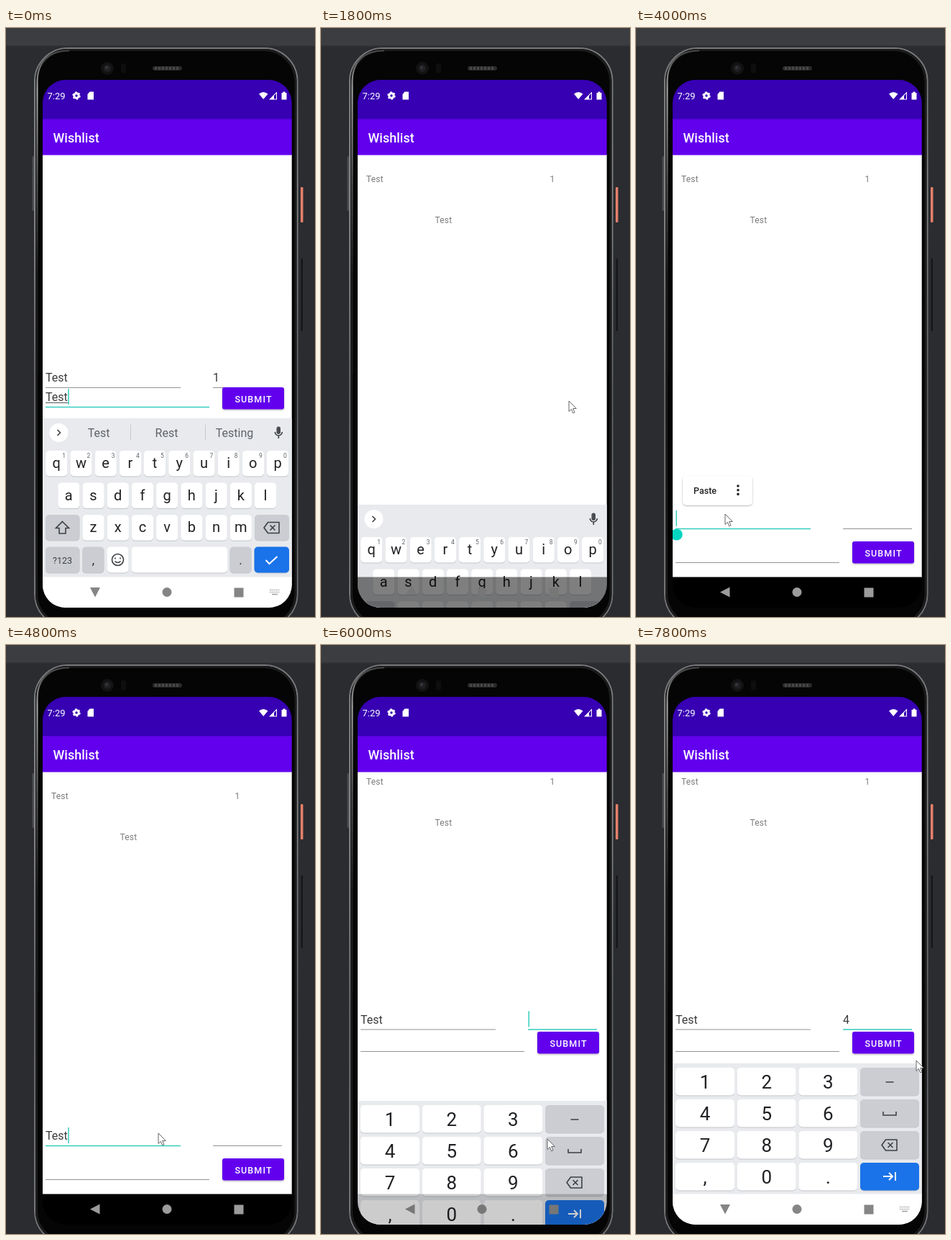
An HTML page that plays this animation: 430x818 px, repeating every 8 s.

```html
<!DOCTYPE html>
<html lang="en">
<head>
<meta charset="utf-8">
<title>Wishlist</title>
<style>
html, body { margin: 0; width: 100%; height: 100%; overflow: hidden; background: #2b2c30 }
svg { display: block; width: 430px; height: 818px; font-family: Roboto, sans-serif }
.mid { text-anchor: middle }
.line { fill: none; stroke: #3c4043; stroke-width: 1.6 }
</style>
</head>
<body>
<svg viewBox="0 0 430 818">
  <defs>
    <clipPath id="screen"><rect x="51" y="72" width="346.700" height="733" rx="32"/></clipPath>
    <linearGradient id="rim" x2="0" y2="1">
      <stop stop-color="#77797b"/><stop offset=".25" stop-color="#858687"/>
      <stop offset=".6" stop-color="#626365"/><stop offset="1" stop-color="#77787a"/>
    </linearGradient>
    <linearGradient id="gleam" x2="0" y2="1">
      <stop stop-color="#444"/><stop offset=".12" stop-color="#aaa"/>
      <stop offset=".4" stop-color="#555"/><stop offset=".7" stop-color="#1a1a1a"/>
    </linearGradient>
    <filter id="soft" x="-20%" y="-30%" width="140%" height="180%">
      <feDropShadow dx="0" dy="1.2" stdDeviation="1.3" flood-opacity=".3"/>
    </filter>
    <g id="erase" class="line">
      <path d="M-11 0L-5.5-7.5H10V7.5H-5.5Z" stroke-linejoin="round"/><path d="M-2.500-3.500l7 7m0-7l-7 7"/>
    </g>
  </defs>

  <rect width="430" height="818" fill="#2b2c30"/>
  <rect width="430" height="24" fill="#3c3d41"/>
  <rect y="24" width="430" height="1.500" fill="#333438"/>

  <!-- phone body -->
  <rect x="36.500" y="178" width="2.500" height="76" rx="1" fill="#4c4d51"/>
  <rect x="410" y="221" width="3.500" height="49" rx="1" fill="#e4806a"/>
  <rect x="410.500" y="320" width="2.500" height="101" rx="1" fill="#161618"/>
  <rect x="40" y="28" width="365.500" height="804" rx="46" fill="#050505" stroke="url(#rim)" stroke-width="2"/>
  <rect x="42.500" y="30.500" width="360.500" height="799" rx="44" fill="none" stroke="#1b1b1c" stroke-width="3"/>
  <path d="M43.500 480V76Q43.500 32 88 31.500" fill="none" stroke="url(#gleam)" stroke-width="2"/>
  <circle cx="141" cy="56" r="9" fill="#121212"/>
  <circle cx="141" cy="56" r="5" fill="#202022"/>
  <circle cx="140" cy="55" r="2" fill="#35373b"/>
  <rect x="160" y="49" width="7" height="14" rx="3" fill="#0e0e0e"/>
  <path d="M207 56H242" stroke="#2a2a2a" stroke-width="6" stroke-linecap="round"/>
  <path d="M207 56H242" stroke="#484848" stroke-width="4" stroke-dasharray="3 2"/>

  <g clip-path="url(#screen)">
    <rect x="51" y="176" width="347" height="587" fill="#fff"/>
    <rect x="51" y="72" width="347" height="55" fill="#3700b3"/>
    <rect x="51" y="126.500" width="347" height="50" fill="#6200ee"/>
    <g fill="#fff">
      <text x="57.500" y="99" font-size="13">7:29</text>
      <circle cx="98" cy="94" r="3.200" fill="none" stroke="#fff" stroke-width="3"/>
      <circle cx="98" cy="94" r="4.900" fill="none" stroke="#fff" stroke-width="1.600" stroke-dasharray="2.6 2.530"/>
      <path d="M113.500 92l3-3.500h5.500v11h-8.500z"/>
      <path d="M352 91.500Q358 86.500 364.500 91.500L358.200 99Z"/>
      <path d="M366 99.500L377 88.500V99.500Z"/>
      <path d="M373 98.500V94L376 91V98.500Z" fill="#3700b3"/>
      <path d="M383.500 90h2v-1.500h3v1.500h2v9.500h-7z"/>
      <text x="65.500" y="159" font-size="18" font-weight="500">Wishlist</text>
    </g>

    <g id="item" font-size="12" letter-spacing=".2" fill="#7b7b7b">
      <text x="63" y="214">Test</text>
      <text x="318.500" y="214">1</text>
      <text x="158.500" y="271">Test</text>
    </g>
    <g id="fields" font-size="16" fill="#3a3a3a"></g>
    <path id="composing" d="M55 520.500H87" stroke="#555"/>
    <rect id="caret" width="1.500" height="22" fill="#35cdbd"/>
    <path id="handle" d="M56.500 695l5.700 2.500a8.200 8.200 0 1 1-11.400 0z" fill="#03d5c0"/>
    <g id="submit">
      <rect id="face" x="301" width="86" height="30.500" rx="3" filter="url(#soft)"/>
      <text x="344.500" y="20.500" class="mid" font-size="12.500" font-weight="500" letter-spacing="1.120" fill="#fff">SUBMIT</text>
    </g>
    <g id="popup">
      <rect x="65" y="622" width="97" height="40.500" rx="5" fill="#fff" filter="url(#soft)"/>
      <text x="80" y="646.500" font-size="12.500" font-weight="500" fill="#222">Paste</text>
      <path d="M142 636v12" stroke="#222" stroke-width="3.600" stroke-linecap="round" stroke-dasharray="0 5.700"/>
    </g>

    <g id="letters"></g>
    <g id="digits"></g>

    <rect id="shade" x="51" y="762.500" width="347" height="43"/>
    <g id="nav">
      <path id="back" d="M117 783.500L130.500 776.500V790.500Z"/>
      <circle cx="224" cy="783.500" r="6.500"/>
      <rect x="317.500" y="777.500" width="13" height="13"/>
    </g>
    <g id="dots" stroke="#a0a0a0" stroke-width="1.500" stroke-dasharray="1.500 1.200">
      <path d="M367 780.500H381M367 783.500H381"/><path d="M370 786.500H378" stroke-dasharray="none"/>
    </g>
  </g>
  <path id="mouse" d="M0 0V14.500L3.400 11.400L5.700 16.800L8 15.800L5.700 10.500H10.300Z" fill="#fff" stroke="#555" stroke-width=".9"/>
</svg>
<script>
const $ = id => document.getElementById(id);
const show = (id, on) => $(id).style.display = on ? '' : 'none';
const move = (id, x, y) => $(id).setAttribute('transform', `translate(${x} ${y})`);
const set = (id, name, value) => $(id).setAttribute(name, value);

const GREY = '#cbcdd3', BLUE = '#1a73e8', TEAL = '#35cdbd';

const key = (x, y, w, h, fill = '#fff') =>
  `<rect x="${x}" y="${y + 1}" width="${w}" height="${h}" rx="5" fill="#c3c5ca"/>` +
  `<rect x="${x}" y="${y}" width="${w}" height="${h}" rx="5" fill="${fill}"/>`;
const label = (s, x, y, size, fill = '#202124') =>
  `<text class="mid" x="${x}" y="${y}" font-size="${size}" fill="${fill}">${s}</text>`;
const panel = y => `<rect x="51" y="${y}" width="347" height="${805 - y}" fill="#e8eaed"/>`;
const icon = (d, x, y, extra = '') =>
  `<path class="line" d="${d}" transform="translate(${x} ${y})" ${extra}/>`;
const erase = (x, y) => `<use href="#erase" x="${x}" y="${y}"/>`;
const white = 'style="stroke:#fff;stroke-width:2"';

function letterBoard() {
  let s = panel(542) + '<circle cx="73.500" cy="562" r="13" fill="#fff"/>' +
    icon('M-2-4l4 4l-4 4', 73.5, 562) + '<g id="hints">' +
    ['Test', 'Rest', 'Testing'].map((w, i) => label(w, 129 + i * 94.5, 568, 16, '#5f6368')).join('') +
    '<path d="M173.500 551v22M277.500 551v22" stroke="#c6c8cc"/></g>' +
    '<rect x="376.500" y="553.500" width="5.500" height="10.500" rx="2.700" fill="#4a4d51"/>' +
    icon('M-5-1a5 5 0 0 0 10 0M0 4v4', 379.3, 562);
  ['qwertyuiop', 'asdfghjkl', 'zxcvbnm'].forEach((row, r) => {
    const y = 587 + r * 44.6;
    [...row].forEach((c, i) => {
      const x = 70.2 + 34.2 * (i + [0, .5, 1.5][r]);
      s += key(x - 15, y, 30.2, 35.5) + label(c, x, y + 24, 20);
      if (!r) s += label((i + 1) % 10, x + 10.5, y + 9.5, 8.5, '#5f6368');
    });
  });
  return s + key(55, 676, 47.5, 35.5, GREY) + key(346, 676, 48, 35.5, GREY) +
    icon('M0-8.500L9 .5H4.500V8H-4.500V.5H-9Z', 78.5, 694) + erase(370, 694) +
    key(55, 720.5, 47.5, 36, GREY) + label('?123', 78.5, 743.5, 12.5, '#3c4043') +
    key(106, 720.5, 30.5, 36, GREY) + label(',', 121.5, 745, 17) +
    key(140.5, 720.5, 30, 36) +
    '<circle class="line" cx="155.500" cy="738.500" r="8"/>' +
    icon('M-4 2q4 4 8 0M-3.500-3v2M3.500-3v2', 155.5, 738.5) +
    key(174.5, 720.5, 133.5, 36) +
    key(311.5, 720.5, 30, 36, GREY) + label('.', 326.5, 745, 17) +
    key(345.5, 720.5, 48.5, 36, BLUE) + icon('M-8 0l5 5l11-10', 369.5, 739, white);
}

function digitBoard() {
  let s = panel(581);
  ['123', '456', '789', ',0.'].forEach((row, r) => {
    const y = 587 + r * 44;
    [...row].forEach((c, i) =>
      s += key(55 + i * 85.7, y, 82, 38.5) + label(c, 96 + i * 85.7, y + 29, 26));
    s += key(312, y, 82, 38.5, r < 3 ? GREY : BLUE);
  });
  return s + icon('M-5.500 0h11', 353, 607) + icon('M-9-3v5h18v-5', 353, 651) + erase(353, 694.5) +
    icon('M-9 0h13M-1-5l5 5l-5 5M8-6v12', 353, 738, white);
}

const fieldX = [[55, 243], [288, 384], [55, 283]];
$('fields').innerHTML = fieldX.map(([a, b], i) =>
  `<g id="field${i}"><text id="text${i}" x="${a}" y="-8.500"></text><path id="line${i}" d="M${a} 0H${b}"/></g>`).join('');
$('letters').innerHTML = letterBoard();
$('digits').innerHTML = digitBoard();

// Each track row is [start time, values...]; the latest started row applies.
const at = (track, t) => track.filter(row => row[0] <= t).pop().slice(1);

const texts = [
  [[0, 'Test'], [1800, ''], [4400, 'Te'], [4600, 'Test']],
  [[0, '1'], [1800, ''], [6800, '4']],
  [[0, 'Test'], [1800, '']]
];
const focus = [[0, 2], [3200, 0], [5400, 1]];
// baselines of the upper and lower fields, top of the button
const layout = [[0, 499.5, 526.5, 499], [1800, 695.5, 742.5, 713], [5800, 534, 564.5, 537]];
const caretOn = [[0, 1], [600, 0], [1000, 1], [1600, 0], [1800, 1], [2200, 0], [2600, 1], [3000, 0],
  [3200, 1], [3600, 0], [4000, 1], [5200, 0], [5400, 1], [6400, 0], [6800, 1], [7200, 0], [7400, 1], [7800, 0]];
const mouse = [[0, -40, 0], [1600, 345, 518], [2000, 295, 560], [2200, 200, 632], [2400, 136, 670],
  [2600, 124, 675], [4400, 160, 678], [4600, 212, 678], [5000, 262, 682], [5200, 315, 686],
  [6800, 340, 655], [7000, 372, 605], [7200, 390, 577]];
// keyboard offset and navigation bar darkness
const slide = [[0, 0, 0], [1800, 120, .5], [2000, 260, 1], [5800, 130, .6], [6000, 52, .2], [6200, 0, 0]];
const tilt = [[0, -90], [1600, -80], [1800, -25], [2000, 0], [6200, -90]];

function draw(t) {
  const [top, low, button] = at(layout, t), [active] = at(focus, t);
  const [drop, dark] = at(slide, t);
  const lineY = [top, top, low];
  lineY.forEach((y, i) => {
    move('field' + i, 0, y);
    $('text' + i).textContent = at(texts[i], t)[0];
    set('line' + i, 'stroke', i === active ? TEAL : '#929292');
    set('line' + i, 'stroke-width', i === active ? 1.7 : 1);
  });
  move('caret', fieldX[active][0] + .5 + $('text' + active).getComputedTextLength(), lineY[active] - 25.5);
  show('caret', at(caretOn, t)[0]);
  show('composing', t < 1800);

  const pressed = t >= 1600 && t < 1800;
  move('submit', 0, button);
  set('face', 'fill', pressed ? '#9b58f5' : '#6200ee');
  show('item', t >= 1800);
  move('item', 0, t < 5800 ? 0 : -20);
  const pasting = t >= 4000 && t < 4400;
  show('popup', pasting);
  show('handle', pasting);

  show('hints', t < 200);
  show('letters', t < 2000);
  show('digits', t >= 5800);
  move('letters', 0, drop);
  move('digits', 0, drop);
  // a resting keyboard leaves the bar white
  set('shade', 'fill', drop ? '#000' : '#fff');
  set('shade', 'opacity', drop ? dark : 1);
  set('nav', 'fill', dark === 1 ? '#9c9c9c' : drop ? '#777' : '#858585');
  set('back', 'transform', `rotate(${at(tilt, t)[0]} 124 783.5)`);
  show('dots', t < 1600 || t >= 6200);
  move('mouse', ...at(mouse, t));
}

const start = performance.now();
function tick() {
  const t = (performance.now() - start) % 8000;
  draw(Math.floor(t / 200) * 200);
  requestAnimationFrame(tick);
}
tick();
</script>
</body>
</html>
```
